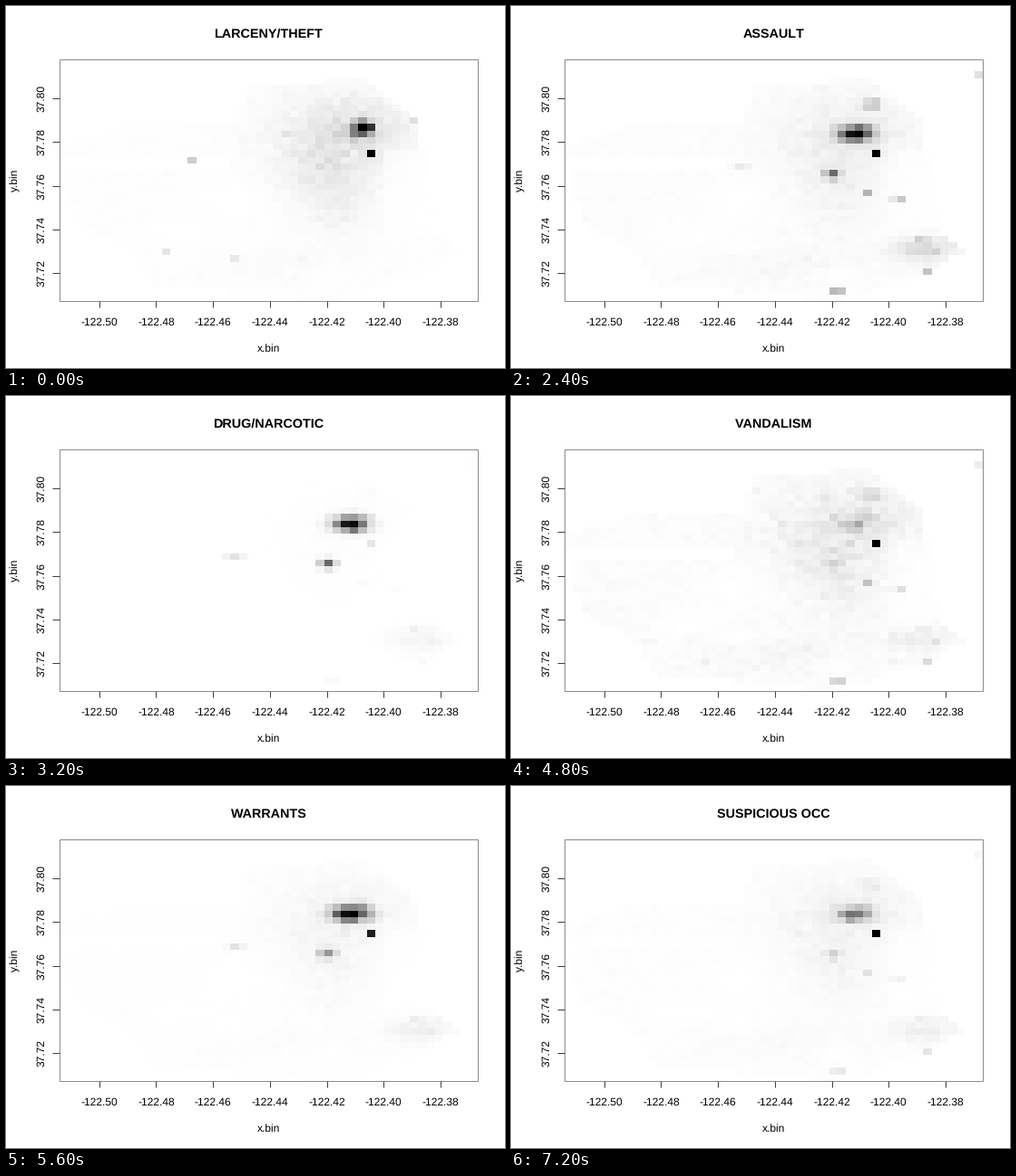
Write a matplotlib script that moves like this. It is 550 px wide and 400 px high and loops after 8000 ms.

```python
import numpy as np
import matplotlib.pyplot as plt
from matplotlib.animation import FuncAnimation
from matplotlib.patches import Rectangle

W, H, DPI = 550, 400, 100
LEFT, RIGHT, TOP, BOTTOM = 58.5, 519.5, 58.5, 325.8
COLS, ROWS = 49, 37
PX = 72 / DPI  # points per pixel

plt.rcParams["font.family"] = "Liberation Sans"
plt.rcParams["text.hinting"] = "none"
plt.rcParams["text.kerning_factor"] = 6  # plain advance widths

R, C = np.mgrid[0:ROWS, 0:COLS]


def blob(c, r, sc=0.25, sr=0.25):
    """Gaussian bump in grid cells; the default width fills a single cell."""
    return np.exp(-0.5 * ((C - c) / sc) ** 2 - 0.5 * ((R - r) / sr) ** 2)


def cells(*places):
    return sum(blob(c, r) for c, r in places)


def city_mask():
    west = np.interp(R, [3, 4, 9, 10, 13, 24, 29, 34, 36],
                     [31, 22, 21, 7, 0, 2, 8, 11, 28])
    east = np.interp(R, [3, 4, 9, 18, 26, 29, 33, 36],
                     [35, 36, 41, 42, 43, 46, 40, 32])
    return (R >= 3) & (C >= np.round(west)) & (C <= np.round(east))


def open_land():
    """Share of each cell that is built up: parks, hills and shore thin it out."""
    built = np.ones((ROWS, COLS))
    built[15:17, :20] = 0.15
    built[14:27, 38:] = 0.5
    for hill in [(19.5, 21, 2.5, 2.5), (20.5, 28, 1.5, 1),
                 (14, 26, 3, 1.5), (31.5, 32.5, 1.6, 1.2)]:
        built *= 1 - 0.85 * blob(*hill)
    return built


MASK = city_mask() * open_land()
PLACES = {
    "core": (blob(35, 10.5, 4, 3.6) + 0.6 * blob(29, 12, 4.5, 5)
             + 0.7 * blob(32, 19, 3, 4.5)) * MASK,
    "city": (1 + 1.5 * blob(26, 31, 7, 2)) * MASK,
    "bay": blob(42, 28.5, 2.5, 1.5) * MASK + cells((41, 27)),
    "tender": blob(33.6, 11, 1.3, 0.75),
    "union": blob(35.1, 10.1, 0.7, 0.75),
    "mission": blob(30.9, 17.1, 0.6, 0.5),
    "haight": blob(20, 16, 0.7, 0.3),
    "hall": cells((36, 14)),
    "square": cells((34, 10)) + 0.5 * cells((35, 9), (31, 10), (37, 31)),
    "edges": blob(35.5, 6.5, 0.6, 0.6) + 0.5 * cells((48, 2), (38, 21), (39, 21))
             + cells((31, 35), (32, 35), (42, 32), (35, 20)),
    "west": cells((12, 29), (20, 30), (15, 15), (41, 9)),
}
GRAIN = np.random.RandomState(7).normal(0, 0.15, (ROWS, COLS))


def density(seed, rough=0.16, **weights):
    """Weighted sum of places, with a grain that spares the strongest cells."""
    own = np.random.RandomState(seed).normal(0, rough, (ROWS, COLS))
    grid = sum(w * PLACES[name] for name, w in weights.items())
    grid = grid * np.exp((GRAIN + own) * (grid < 0.6))
    return np.clip(grid, 0, 1)


SCENES = [
    ("LARCENY/THEFT", density(1, core=.08, city=.007, union=1, tender=.05,
                              hall=1, west=.11)),
    ("OTHER OFFENSES", density(2, core=.06, city=.015, bay=.09, tender=.95,
                               hall=.95, mission=.4, haight=.08)),
    ("NON-CRIMINAL", density(3, core=.05, city=.009, bay=.015, union=.3,
                             tender=.3, hall=1, mission=.15)),
    ("ASSAULT", density(4, core=.045, city=.011, bay=.12, tender=.95,
                        hall=.92, mission=.5, haight=.07, edges=.26)),
    ("DRUG/NARCOTIC", density(5, core=.006, city=.001, bay=.04, tender=1,
                              hall=.1, mission=.55, haight=.12, edges=.02)),
    ("VEHICLE THEFT", density(6, rough=.25, core=.22, city=.05, bay=.13,
                              square=.9, edges=.25)),
    ("VANDALISM", density(7, core=.06, city=.013, bay=.05, tender=.14,
                          hall=1, mission=.1, edges=.16)),
    ("WARRANTS", density(8, core=.03, city=.005, bay=.05, tender=1,
                         hall=.85, mission=.4, haight=.08)),
    ("BURGLARY", density(9, core=.085, city=.014, bay=.05, union=.9,
                         tender=.12, hall=.55, edges=.2, west=.07)),
    ("SUSPICIOUS OCC", density(10, core=.035, city=.008, bay=.05, tender=.5,
                               hall=1, mission=.13, edges=.08)),
]

fig = plt.figure(figsize=(W / DPI, H / DPI), dpi=DPI, facecolor="white")
ax = fig.add_axes([0, 0, 1, 1])
ax.axis("off")
image = ax.imshow(SCENES[0][1], cmap="gray_r", vmin=0, vmax=1, aspect="auto",
                  interpolation="nearest", extent=(LEFT, RIGHT, BOTTOM, TOP))
ax.set_xlim(0, W)
ax.set_ylim(H, 0)


def label(x, y, text, size=12, **style):
    return ax.text(x, y, text, fontsize=size * PX, ha="center", va="baseline",
                   rotation_mode="anchor", **style)


def line(xs, ys):
    ax.plot(xs, ys, color="0.25", lw=PX, solid_capstyle="butt")


ax.add_patch(Rectangle((LEFT, TOP), RIGHT - LEFT, BOTTOM - TOP,
                       fill=False, ec="0.55", lw=PX))
for i in range(7):
    x = 102.8 + 62.68 * i
    line([x, x], [BOTTOM, BOTTOM + 7.2])
    label(x, 353, f"{-122.50 + 0.02 * i:.2f}")
for i in range(5):
    y = 102.2 + 48.2 * i
    line([LEFT - 7.2, LEFT], [y, y])
    label(42, y, f"{37.80 - 0.02 * i:.2f}", rotation=90)
label(289.4, 381.6, "x.bin")
label(13, 192.8, "y.bin", rotation=90)
title = label(289.4, 34.8, "", size=14.4, weight="bold")


def draw(i):
    name, grid = SCENES[i]
    title.set_text(name)
    image.set_data(grid)
    return image, title


anim = FuncAnimation(fig, draw, frames=len(SCENES), interval=800,
                     repeat=True, repeat_delay=0)
plt.show()
```
